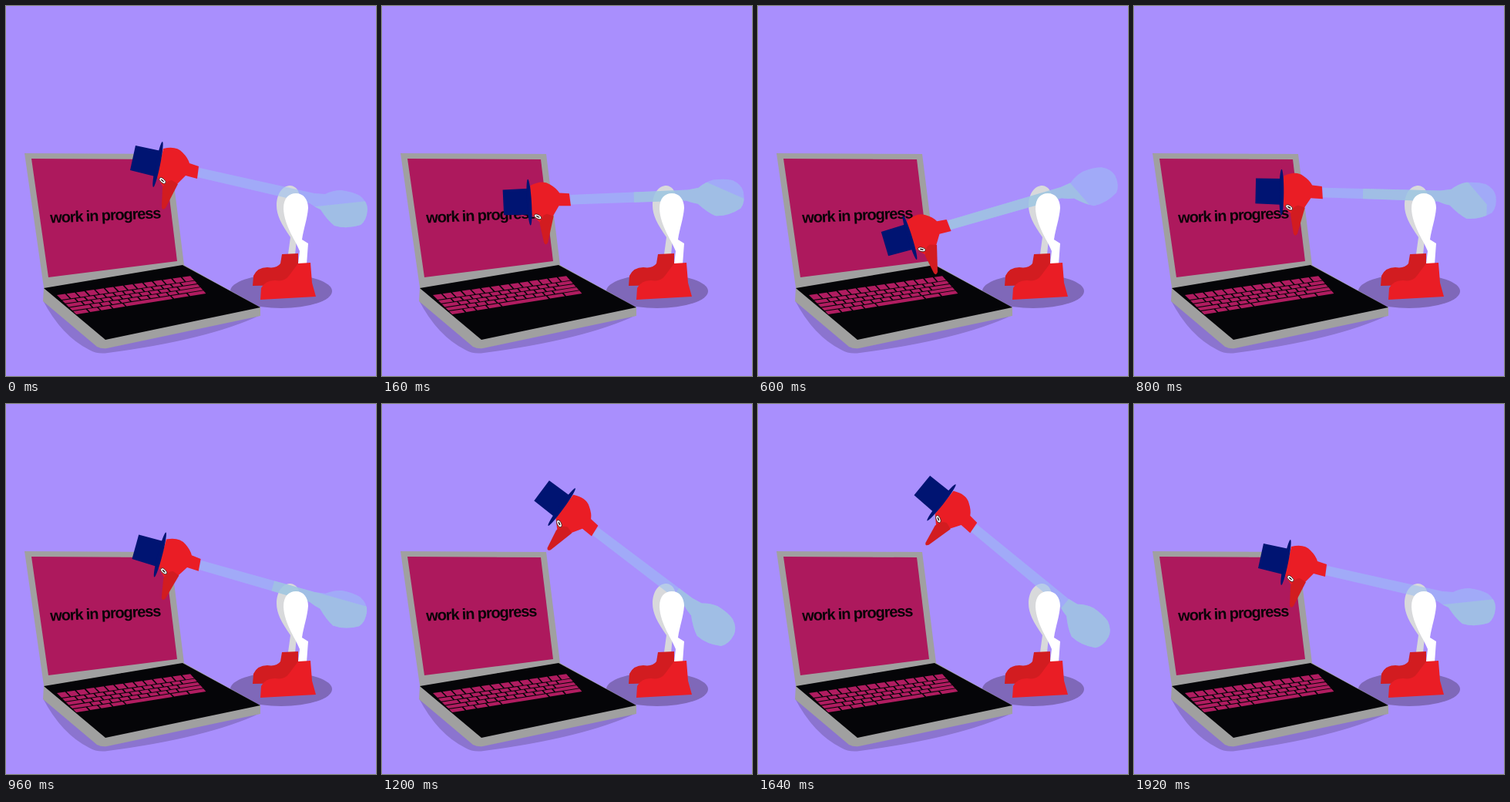
An HTML page that plays this animation: 480 by 480 pixels, repeating every 1960 ms.

```html
<!DOCTYPE html>
<html lang="en">
<head>
<meta charset="utf-8">
<title>Work in progress</title>
<style>
  html, body { margin: 0; width: 100%; height: 100%; overflow: hidden; background: #a98ffd; }
  svg { display: block; width: 100vw; height: 100vh; }
  text { font: bold 20px "Liberation Sans", Arial, sans-serif; letter-spacing: -1.12px; }
</style>
</head>
<body>
<svg viewBox="0 0 480 480">
  <defs>
    <path id="glassShape" d="M251 210 L400 243 L414 244 Q424 239 435 239 Q450 241 459 246 Q469 254 469 264
      Q468 278 460 284 Q442 290 426 285 Q417 278 408 264 Q401 261 394 256 L248 222Z"/>
    <clipPath id="glassClip"><use href="#glassShape"/></clipPath>
  </defs>

  <rect width="480" height="480" fill="#a98ffd"/>
  <ellipse cx="357" cy="370" rx="66" ry="22" fill="#7f68b9"/>

  <g id="laptop">
    <path d="M48 382 Q72 428 108 446 Q118 452 132 450 Q262 433 330 401Z" fill="#8b74cf"/>
    <path d="M24 191 L213 192 L231 336 L330 391 L330 402 L131 444 Q124 445 118 442 L48 383 L49 365Z" fill="#a0a0a0"/>
    <path d="M33 198 L206 199 L222 331 L55 352Z" fill="#ad195d"/>
    <path d="M49 366 L229 336 L330 391 L129 433Z" fill="#050508"/>
    <path id="keys" fill="#b01c60"/>
    <text transform="translate(57.500 281.500) rotate(-2.500)" fill="#0a0408">work in progress</text>
  </g>

  <path d="M351 259 C351 243 359 233 369 233 C377 234 380 240 381 247 L371 288 L377 302 L375 323 L366 322
    L369 300 C357 283 351 271 351 259Z" fill="#d8d9db"/>
  <path d="M358 322 L379 321 L379 345 L366 362 L320 363 L321 350 Q326 339 339 339 Q351 341 356 334Z" fill="#d21c20"/>

  <g id="bird">
    <use href="#glassShape" fill="#9bc2f5" fill-opacity=".55"/>
    <g clip-path="url(#glassClip)">
      <path id="liquid" transform="translate(381 253) rotate(13)" fill="#9fc9dd" fill-opacity=".68"/>
    </g>
    <path d="M204 185 Q221 181 229 190 Q236 197 238 204 L250 208 L248 224 L233 220 L222 231 L204 235 L196 222Z" fill="#ea1d25"/>
    <path d="M203 236 Q208 226 215 226 L223 231 L207 262 Q203 266 202 261Z" fill="#d21c20"/>
    <g fill="#001472">
      <path d="M168 181 L201 188 L193 221 L161 213Z"/>
      <ellipse cx="197" cy="205.500" rx="30" ry="3" transform="rotate(-78.500 197 205.500)"/>
    </g>
    <g transform="translate(203 226.500) rotate(-49)">
      <ellipse rx="2.600" ry="5" fill="#fff" stroke="#20100c" stroke-width=".7"/>
      <ellipse rx=".8" ry="2.600" fill="#20100c"/>
    </g>
  </g>

  <path d="M360 263 C360 249 367 243 376 243 C386 243 392 251 392 262 C391 276 386 289 384 303 L392 308
    L390 335 L379 335 L381 318 C377 306 361 286 360 263Z" fill="#fff"/>
  <path d="M379 334 L395 333 L397 359 L402 377 L330 381 L331 366 Q337 355 350 356 Q361 358 367 350Z" fill="#ea1d25"/>
</svg>

<script>
const FRAME = 40, LOOP = 1960;
const byId = id => document.getElementById(id);
const mix = (a, b, k) => a + (b - a) * k;

// Each key: frame index, then the values at that frame.
const swing = [[0, 0], [7, -26.2], [15, -28.9], [36, 45.8], [48, 0]];

// Liquid surface from (x1, y1) to (x2, y2), along the tube.
const surface = [
  [0, 14, 5, 98, -24],
  [8, -122, -142, 80, 24],
  [15, -142, -376, 48, 23],
  [24, -38, -14, 100, -15],
  [34, 17, -60, 100, -60],
  [43, 17, -60, 100, -60],
  [48, 14, 5, 98, -24]
];

function sample(keys, frame) {
  const i = Math.max(1, keys.findIndex(key => key[0] >= frame));
  const a = keys[i - 1], b = keys[i];
  const k = (frame - a[0]) / (b[0] - a[0]);
  return a.slice(1).map((v, j) => mix(v, b[j + 1], k));
}

// Keyboard point: u runs along a row, v from back to front.
function keyPoint(u, v) {
  const x = mix(mix(66, 241, u), mix(92, 262, u), v);
  const y = mix(mix(375, 350, u), mix(401, 373.5, u), v);
  return x.toFixed(1) + " " + y.toFixed(1);
}

function drawKeys() {
  const same = (n, w = 1) => Array(n).fill(w);
  const rows = [
    same(14),
    [1.4, ...same(11), 1.6],
    [1.7, ...same(10), 2.2],
    [2.2, ...same(9), 2.6],
    [1.4, 1.1, 1.2, 1.3, 4.7, 1.6, 1.7]
  ];
  const edges = [0, .27, .45, .63, .81, 1];
  let d = "";
  rows.forEach((row, r) => {
    const total = row.reduce((a, b) => a + b);
    const top = edges[r], bottom = edges[r + 1] - .035;
    let at = 0;
    for (const w of row) {
      const left = at / total, right = (at + w) / total - .011;
      d += `M${keyPoint(left, top)}L${keyPoint(right, top)}L${keyPoint(right, bottom)}L${keyPoint(left, bottom)}Z`;
      at += w;
    }
  });
  byId("keys").setAttribute("d", d);
}

function render(time) {
  const frame = Math.floor((time % LOOP) / FRAME);
  const [angle] = sample(swing, frame);
  const [x1, y1, x2, y2] = sample(surface, frame);
  byId("bird").setAttribute("transform", `rotate(${angle} 381 253)`);
  byId("liquid").setAttribute("d", `M${x1} ${y1}L${x2} ${y2}V70H${x1}Z`);
}

drawKeys();
render(0);
const start = performance.now();
(function tick() {
  render(performance.now() - start);
  requestAnimationFrame(tick);
})();
</script>
</body>
</html>
```
